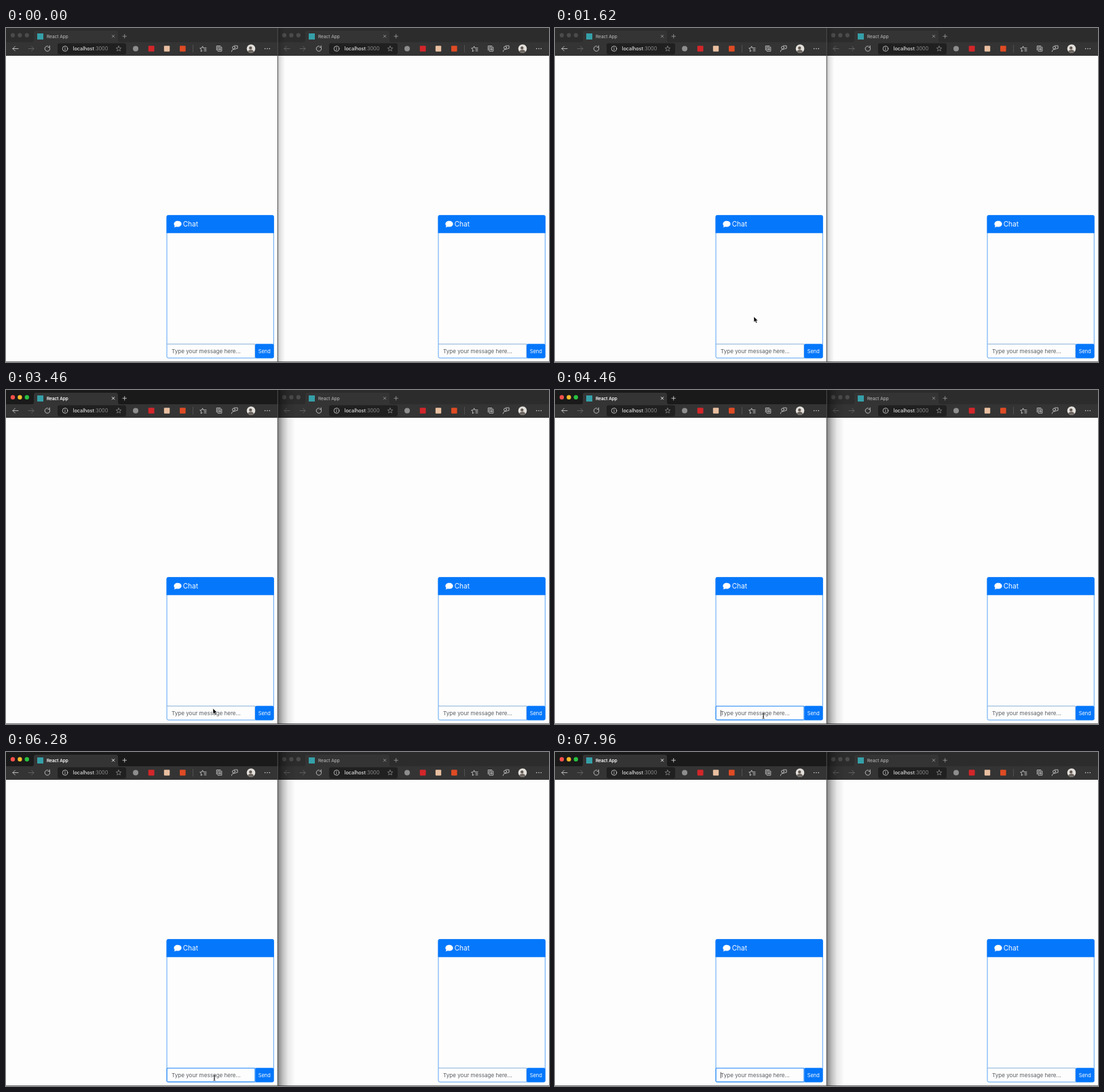
Animation of 800x493 px, one loop 8 s. Source, as an HTML page:

```html
<!DOCTYPE html>
<html lang="en">
<head>
<meta charset="utf-8">
<title>Chat in two windows</title>
<style>
  html, body { margin: 0; width: 100%; height: 100%; overflow: hidden; background: #fdfdfd; }
  svg { display: block; width: 100vw; height: 100vh; font-family: Inter, "Open Sans", sans-serif; }
  .line { fill: none; stroke: #e2e2e2; stroke-width: .75; stroke-linecap: round; stroke-linejoin: round; }
  .dim { stroke: #6e6e6e; }

  .active, .idle, .focus, .caret, .arrow, .beam { animation: 8s step-end infinite; }
  .active { animation-name: activate; }
  .idle { animation-name: deactivate; }
  .focus { animation-name: focus; }
  .caret { animation-name: blink; }
  .arrow { animation-name: arrow; }
  .beam { animation-name: beam; }
  .pointer { animation: move 8s ease-in-out infinite; }

  @keyframes activate { 0% { opacity: 0 } 43%, 100% { opacity: 1 } }
  @keyframes deactivate { 0% { opacity: 1 } 43%, 100% { opacity: 0 } }
  @keyframes focus { 0% { opacity: 0 } 55%, 100% { opacity: 1 } }
  @keyframes blink {
    0%, 61.25%, 73.75%, 86.25% { opacity: 0 }
    55%, 67.5%, 80%, 92.5%, 100% { opacity: 1 }
  }
  @keyframes arrow { 0% { opacity: 0 } 12% { opacity: 1 } 49%, 100% { opacity: 0 } }
  @keyframes beam { 0% { opacity: 0 } 49% { opacity: 1 } 98.75%, 100% { opacity: 0 } }
  @keyframes move {
    0%, 12% { transform: translate(300px, 494px) }
    18.5%, 25% { transform: translate(293px, 426px) }
    33%, 47% { transform: translate(305px, 470px) }
    51%, 100% { transform: translate(307px, 481px) }
  }
</style>
</head>
<body>
<svg viewBox="0 0 800 493" preserveAspectRatio="none">
  <defs>
    <linearGradient id="softShadow">
      <stop offset="0" stop-opacity=".24"/>
      <stop offset=".4" stop-opacity=".1"/>
      <stop offset="1" stop-opacity="0"/>
    </linearGradient>
    <linearGradient id="deepShadow">
      <stop offset="0" stop-opacity=".5"/>
      <stop offset=".3" stop-opacity=".24"/>
      <stop offset=".6" stop-opacity=".08"/>
      <stop offset="1" stop-opacity="0"/>
    </linearGradient>
    <clipPath id="round"><circle cx="361" cy="30.5" r="6.3"/></clipPath>
    <path id="star" d="M0-3.8 1.1-1.3 3.8-1.1 1.7.7 2.4 3.4 0 1.9-2.4 3.4-1.7.7-3.8-1.1-1.1-1.3Z"/>

    <g id="tabLabel" font-size="6.5">
      <text x="60" y="14.6">React App</text>
      <path d="M156 10.2l4 4m0-4l-4 4M171.5 12.2h6.4m-3.2-3.2v6.4" fill="none" stroke="currentColor" stroke-width=".8"/>
    </g>

    <g id="window">
      <rect width="400" height="493" fill="#fdfdfd"/>
      <rect width="400" height="41" fill="#2c2c2c"/>
      <path d="M38 21q3 0 3-3V7q0-3 3-3h118q3 0 3 3v11q0 3 3 3h232v20H0V21Z" fill="#343434"/>
      <g fill="#4b4b4b">
        <circle cx="10" cy="10.7" r="3.1"/><circle cx="20.4" cy="10.7" r="3.1"/><circle cx="30.8" cy="10.7" r="3.1"/>
      </g>
      <rect x="46" y="8" width="9" height="9" fill="#35a0a8"/>
      <use href="#tabLabel" fill="#c4c4c4" color="#a0a0a0"/>

      <g class="line">
        <path class="dim" d="M33 30.5h8m-3.4-3.4 3.4 3.4-3.4 3.4"/>
        <path d="M64 28.2a3.8 3.8 0 1 1-2.6-1.5M64.2 26.1v2.2h-2.2"/>
      </g>
      <rect x="76" y="22.5" width="101" height="16.5" rx="3" fill="#202020"/>
      <g class="line">
        <circle cx="87" cy="30.5" r="3.8"/><path d="M87 30v2.3M87 28.4v.1"/>
        <use href="#star" x="166" y="30.5" stroke="#8c8c8c"/>
      </g>
      <text x="98.7" y="33.2" font-size="7.3" fill="#fdfdfd">localhost<tspan fill="#8e8e8e">:3000</tspan></text>

      <circle cx="191" cy="30.5" r="4" fill="#8e8e8e"/>
      <rect x="209.7" y="26.2" width="8.8" height="8.6" rx="1" fill="#d3262a"/>
      <rect x="232.8" y="26.2" width="8.4" height="8.6" rx="1" fill="#e9bfa0"/>
      <rect x="256" y="26.2" width="8.6" height="8.6" rx="1" fill="#df4b24"/>
      <path d="M275.5 25v11" stroke="#585858" stroke-width=".8"/>
      <g class="line">
        <path d="M289.2 33.6l-2 1 .5-2.9-2-1.8 2.7-.4 1.2-2.6 1.2 2.6M291.5 29.4h3.5m-3 2.2h3m-3 2.2h3"/>
        <path d="M312.5 28.2h5.3v6h-5.3ZM310.3 32.7v-6.2h5.5M315.1 29.5v3.4m-1.7-1.7h3.4"/>
        <circle cx="335.5" cy="29" r="2"/>
        <path d="M332.3 34.8q.4-3.5 4-3.3M336.5 26.2h4.6v4h-2l-1.5 1.6"/>
      </g>
      <g clip-path="url(#round)">
        <rect x="354" y="24" width="14" height="14" fill="#e3e0dc"/>
        <circle cx="360.3" cy="29.4" r="2.2" fill="#5f5650"/>
        <path d="M355 38q1-6 6-6 4 0 5 6Z" fill="#6c6560"/>
      </g>
      <g fill="#eaeaea">
        <circle cx="381.7" cy="30.5" r=".7"/><circle cx="385" cy="30.5" r=".7"/><circle cx="388.3" cy="30.5" r=".7"/>
      </g>

      <rect x="237" y="276.8" width="157.3" height="210.3" rx="2" fill="#fdfdfd" stroke="#5aa5f5" stroke-width="1"/>
      <path d="M236.5 302.7v-24q0-2.4 2.4-2.4h153.5q2.4 0 2.4 2.4v24Z" fill="#0577fb"/>
      <path d="M253 284.8c3.2 0 5.6 1.9 5.6 4.4s-2.4 4.4-5.6 4.4c-.8 0-1.5-.1-2.2-.3-.9.7-2 1-3.4 1 .7-.7 1.2-1.5 1.3-2.3-.9-.8-1.3-1.8-1.3-2.8 0-2.5 2.4-4.4 5.6-4.4Z" fill="#fdfdfd"/>
      <text x="260.7" y="293.2" font-size="10.1" fill="#fdfdfd">Chat</text>
      <path d="M237 466.5h130v20.5" fill="none" stroke="#90b4d8" stroke-width="1"/>
      <text x="244" y="480" font-size="8.1" fill="#595d61">Type your message here...</text>
      <rect x="367" y="466.3" width="27.5" height="20.9" rx="2" fill="#0577fb"/>
      <text x="380.7" y="479.7" font-size="7.4" fill="#fdfdfd" text-anchor="middle">Send</text>
      <rect y="492" width="400" height="1" fill="#777"/>
    </g>
  </defs>

  <use href="#window" x="400"/>
  <path class="line dim" d="M418 30.5h-8m3.4-3.4-3.4 3.4 3.4 3.4"/>
  <rect class="idle" x="400" width="11" height="493" fill="url(#softShadow)"/>
  <rect class="active" x="400" width="26" height="493" fill="url(#deepShadow)"/>

  <use href="#window"/>
  <path class="line" d="M18 30.5h-8m3.4-3.4-3.4 3.4 3.4 3.4"/>
  <g class="active">
    <path d="M0 0h400v21H168q-3 0-3-3V7q0-3-3-3H44q-3 0-3 3v11q0 3-3 3H0Z" fill="#1a1a1a"/>
    <circle cx="10" cy="10.7" r="3.2" fill="#f8504a"/>
    <circle cx="20.4" cy="10.7" r="3.2" fill="#f5bb2c"/>
    <circle cx="30.8" cy="10.7" r="3.2" fill="#29c140"/>
    <use href="#tabLabel" fill="#fdfdfd" color="#dedede"/>
  </g>
  <path d="M400.3 0v493" stroke="#505050" stroke-width="1"/>

  <rect class="focus" x="237" y="466.6" width="130" height="20.3" rx="1.5" fill="none" stroke="#4b9dfa" stroke-width="1.3"/>
  <path class="caret" d="M244.3 472.5v9" stroke="#262626" stroke-width=".8"/>

  <g class="pointer">
    <path class="arrow" d="M0 0v8.2l1.9-1.7 1.4 3 1.5-.7-1.4-2.9h2.6Z" fill="#050505" stroke="#fdfdfd" stroke-width=".5"/>
    <path class="beam" d="M-1.5-4q1.5 0 1.5 1.2V2.8Q0 4-1.5 4M1.5-4Q0-4 0-2.8M1.5 4Q0 4 0 2.8M-1 1h2" fill="none" stroke="#151515" stroke-width=".9"/>
  </g>
</svg>
</body>
</html>
```
